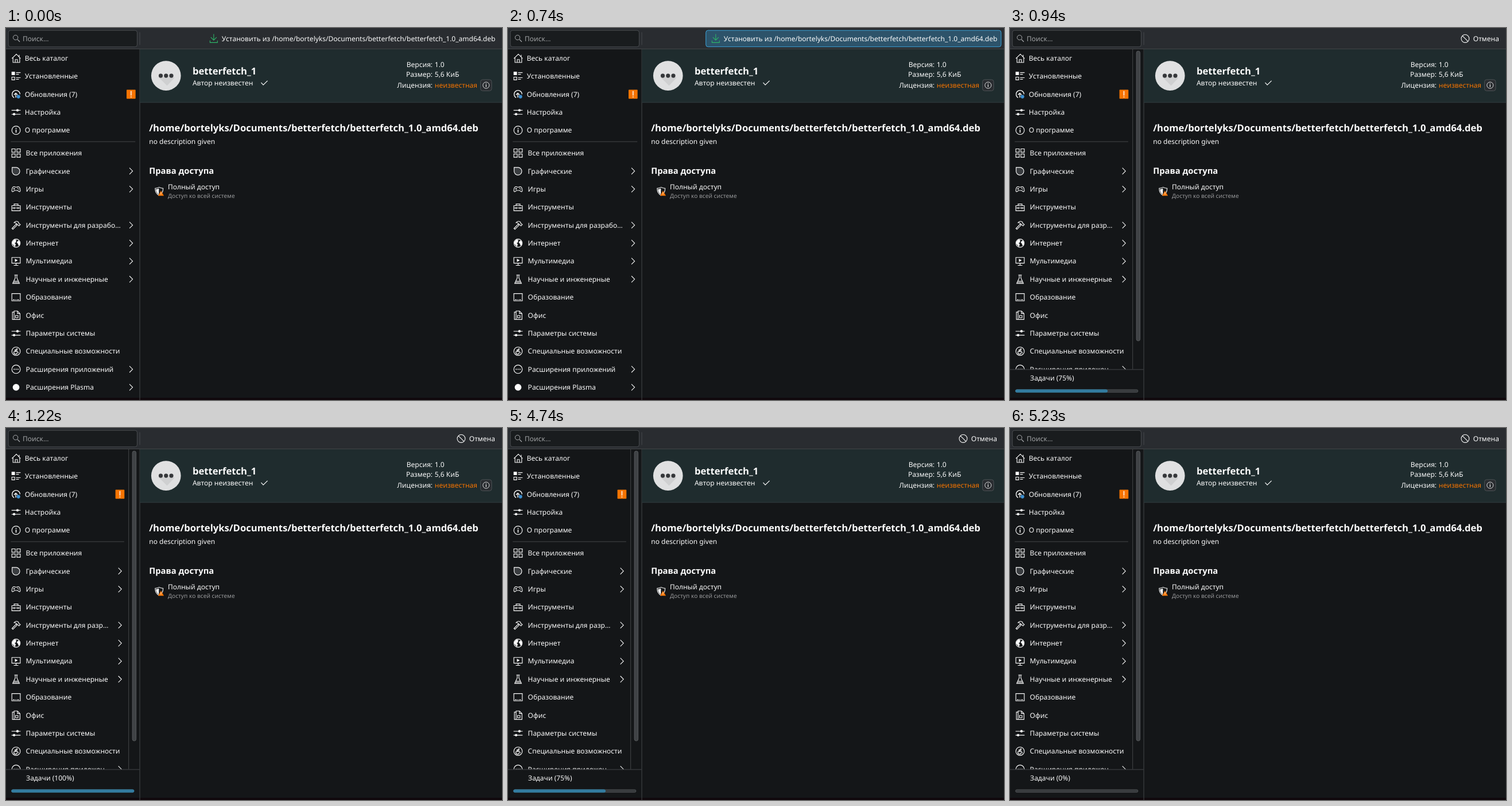
An HTML page that plays this animation: 864 px wide and 648 px high, repeating every 8000 ms.

```html
<!DOCTYPE html>
<html lang="ru">
<head>
<meta charset="utf-8">
<title>Установка пакета</title>
<style>
html, body { margin: 0; width: 100%; height: 100%; overflow: hidden; background: #141618; }
svg { display: block; width: 864px; height: 648px; }
text { font: 13px "Noto Sans", sans-serif; fill: #fcfcfc; white-space: pre; text-rendering: geometricPrecision; }
.line { fill: none; stroke: #fcfcfc; stroke-width: 1.15; }
.fill { fill: #fcfcfc; stroke: none; }
.edge { fill: none; stroke: #484b4e; }
</style>
</head>
<body>
<svg id="stage" viewBox="0 0 936 702" xmlns="http://www.w3.org/2000/svg"></svg>
<script>
const stage = document.getElementById('stage');
const FILE = '/home/bortelyks/Documents/betterfetch/betterfetch_1.0_amd64.deb';

const label = (x, y, s, extra = '') => `<text x="${x}" y="${y}" ${extra}>${s}</text>`;
const line = (d, extra = '') => `<path class="line" d="${d}" ${extra}/>`;
const solid = (d, extra = '') => `<path class="fill" d="${d}" ${extra}/>`;
const dot = (x, y, r, extra = 'class="fill"') => `<circle cx="${x}" cy="${y}" r="${r}" ${extra}/>`;
const ring = (x, y, r) => dot(x, y, r, 'class="line"');
const rect = (x, y, w, h, extra) => `<rect x="${x}" y="${y}" width="${w}" height="${h}" ${extra}/>`;
const bold = size => `style="font-size:${size}px;font-weight:700"`;

// Icons live in a 16 by 16 box
const sliders = line('M0 4.5H16M0 11.5H16') + dot(10.5, 4.5, 2.2) + dot(4.5, 11.5, 2.2);
const info = ring(8, 8, 7.5) + solid('M7.2 3.8h1.6v1.7h-1.6zM7.2 6.8h1.6v5.4h-1.6z');
const icons = {
  home: line('M.5 8.5L8.5 .7L16 8.5M2.5 7V15.5H14.5V7M6.5 15.5V10.5H10.5V15.5M13.5 5.5V2'),
  installed: solid('M0 0h6v6h-6z') + line('M.5 9.5h5v5h-5zM8 1.5h8M8 4.5h5M8 10.5h8M8 13.5h5'),
  updates: line('M4.5 14.2A7 7 0 1 1 15 8M7.5 14V6.2M4.3 9.2L7.5 6L10.7 9.2', 'style="stroke-width:1.4"') +
    dot(12.2, 12.3, 3.2, 'fill="#3d8fd0"'),
  sliders,
  info,
  grid: line('M.5 .5h6v6h-6zM9.5 .5h6v6h-6zM.5 9.5h6v6h-6zM9.5 9.5h6v6h-6z'),
  graphics: line('M1 1.5H8.5A6.8 6.8 0 1 1 1 8.5Z', 'style="fill:#3a3d40"'),
  games: line('M4.5 3.5C5.5 3.5 6 4.5 7 4.5H9C10 4.5 10.5 3.5 11.5 3.5C14 3.5 15.5 7 15.5 10.5C15.5 13.5 13 13 11 10.5H5C3 13 .5 13.5 .5 10.5C.5 7 2 3.5 4.5 3.5ZM3 7.5H6M4.5 6V9') +
    dot(11, 6.5, .8) + dot(12.5, 8.2, .8),
  toolbox: line('M.5 5.5H15.5V14.5H.5ZM4.5 5.5V2.5H11.5V5.5M.5 9.5H15.5M4.5 8V11.5M11.5 8V11.5'),
  hammer: line('M.7 14L8 6.5L9.7 8.2L2.4 15.5ZM4.5 3.5C7.5 .5 10.5 .7 12.5 3L12.5 4.5L15.5 7L13.2 9.3L10.5 6.7L8.5 5.2C7.5 3.8 6.3 3.5 4.5 3.5Z'),
  globe: ring(8, 8, 7.3) + solid('M1.5 5.5L5 1.6L9 2L7.5 4.5L8.5 6L5.5 8L7.5 10L6 14.7L3.5 11.5L1.4 9ZM10 5L13 3L15 7L14.5 11.5L12 12L11.5 9L9.5 7.5Z'),
  media: line('M.5 1.5H15.5V11.5H.5ZM8 11.5V15M4 15.5H12') + solid('M6 3.7L11 6.5L6 9.3Z'),
  science: line('M5 .5H11M6.5 .5V6L2 15.5H14L9.5 6V.5M4.2 11.5H11.8') + solid('M4.3 12H11.7L13 15H3Z', 'opacity=".45"'),
  school: line('M.5 1.5H15.5V14.5H.5ZM2.5 12.5H5.5M7 12.5H8.5M10 12.5H13'),
  office: line('M4.5 2.5H1.5V15.5H4.5M4.5 .5H10.5L15 5V15.5H4.5ZM10.5 .5V5H15M7 8.5H11.5V12.5H7Z'),
  access: ring(8, 8, 7.5) + line('M8.5 5.2L7.2 8.5H10.5L12.2 11.5M7 7.2A3 3 0 1 0 10 11M5.5 5.5L8.5 5.2L10.5 6.3', 'style="stroke-width:1.3"') + dot(9.6, 3.6, 1.1),
  addons: ring(8, 8, 7.5) + dot(4.6, 8, 1) + dot(8, 8, 1) + dot(11.4, 8, 1),
  plain: dot(8, 8, 6)
};
const icon = (name, x, y, scale = 1.06) =>
  `<g transform="translate(${x} ${y}) scale(${scale}) translate(-8 -8)">${icons[name]}</g>`;

const main = [
  ['home', 'Весь каталог'], ['installed', 'Установленные'], ['updates', 'Обновления (7)'],
  ['sliders', 'Настройка'], ['info', 'О программе']
];
// icon, text, has submenu, text when narrow
const groups = [
  ['grid', 'Все приложения'],
  ['graphics', 'Графические', 1],
  ['games', 'Игры', 1],
  ['toolbox', 'Инструменты'],
  ['hammer', 'Инструменты для разрабо…', 1, 'Инструменты для разр…'],
  ['globe', 'Интернет', 1],
  ['media', 'Мультимедиа', 1],
  ['science', 'Научные и инженерные', 1],
  ['school', 'Образование'],
  ['office', 'Офис'],
  ['sliders', 'Параметры системы'],
  ['access', 'Специальные возможности'],
  ['addons', 'Расширения приложений', 1, 'Расширения приложен…'],
  ['plain', 'Расширения Plasma', 1]
];

function sidebar(narrow) {
  const shift = narrow ? -21 : 0;
  const base = 4.7;
  let s = main.map(([name, text], i) => {
    const y = 57 + 34 * i;
    return icon(name, 19, y) + label(35.5, y + base, text);
  }).join('');
  s += `<g transform="translate(${shift} 0)">` + rect(227.5, 116.5, 17, 17, 'rx="1" fill="#f67400"') +
    solid('M235.2 119h1.6v8.5h-1.6zM235.2 129.3h1.6v1.9h-1.6z') + '</g>';
  s += `<path class="edge" d="M9 214.5H${244 + shift}"/>`;
  groups.forEach(([name, text, sub, short], i) => {
    const y = 236 + 34 * i;
    s += icon(name, 19, y) + label(37.5, y + base, narrow && short || text);
    if (sub) s += line(`M${233 + shift} ${y - 6}l6 6l-6 6`);
  });
  return s;
}

const banner = rect(253, 40, 683, 100, 'fill="#1f2c2e"') +
  '<path class="edge" d="M253 140.5H936" style="stroke:#364346"/>' +
  dot(302, 90, 28, 'fill="url(#disc)"') +
  '<path d="M287 92L304 109L318 94L313 91Z" fill="#000" opacity=".07"/>' +
  [292, 302, 312].map(x => dot(x, 90, 3.9, 'fill="#35373a"')).join('') +
  label(352, 88, 'betterfetch_1', bold(18)) +
  label(352, 108, 'Автор неизвестен') + line('M481.5 103L485.5 107.5L493.5 99.5', 'style="stroke-width:1.3"') +
  [['Версия:', '1.0', 74], ['Размер:', '5,6 КиБ', 92], ['Лицензия:', 'неизвестная', 113]].map(([k, v, y]) =>
    label(805, y, k, 'text-anchor="end"') +
    label(809, y, v, y > 100 ? 'style="fill:#f67400"' : '')).join('') +
  rect(895.5, 97.5, 21, 21, 'rx="4" fill="#292c30" stroke="#51575a"') +
  icon('info', 906, 108, .8);

const details = label(270, 195, FILE, bold(18)) +
  label(270, 219, 'no description given') +
  label(270, 275.7, 'Права доступа', bold(16)) +
  label(305.5, 304.7, 'Полный доступ') +
  label(305.5, 320.8, 'Доступ ко всей системе', 'style="font-size:11px;fill:#999a9c"') +
  line('M289 300.5C286 302 284 302.5 281.5 302.5C281.5 309 283 313 289 316C295 313 296.5 309 296.5 302.5C294 302.5 292 302 289 300.5Z') +
  solid('M288.5 302.5C286.5 303.7 285 304 283 304.2C283.3 309 285 312.2 288.5 314.2Z') +
  '<path d="M292.5 307L298 316.5H287Z" fill="#f67400"/>' + solid('M292 310h1v3h-1zM292 314h1v1h-1z');

stage.innerHTML = `
<defs>
  <linearGradient id="disc" x2="0" y2="1"><stop stop-color="#e1e1e2"/><stop offset="1" stop-color="#dedfe0"/></linearGradient>
  <clipPath id="list"><rect width="252" height="644"/></clipPath>
</defs>
${rect(0, 0, 936, 702, 'fill="#141618"')}
${rect(0, 0, 936, 40, 'id="bar"')}
${rect(0, 698, 936, 4, 'fill="#10080c"')}
<path class="edge" d="M0 39.5H936M252.5 40V702M252.5 8V32"/>
${rect(4.5, 4.5, 243, 31, 'rx="4" fill="#191c1e" stroke="#4d5053"')}
${line('M21.5 21.5L26 26', 'style="stroke:#b5b7b9"')}${dot(18, 18, 4.5, 'fill="none" stroke="#b5b7b9"')}
${label(31.5, 25, 'Поиск…', 'style="fill:#a2a4a6"')}
${banner}${details}
<g id="wide">${sidebar(false)}</g>
<g id="narrow">
  <g clip-path="url(#list)">${sidebar(true)}</g>
  <path class="edge" d="M231.5 40V644M0 644.5H252"/>
  ${rect(238.5, 43.5, 7, 547, 'rx="3.5" fill="#3f4245" stroke="#5a5d5f"')}
  <text id="task" x="38" y="665"></text>
  ${rect(10.5, 682.5, 231, 5, 'rx="2.5" fill="#36393c" stroke="#505356"')}
  ${rect(10.5, 682.5, 0, 5, 'id="done" rx="2.5"')}
</g>
<g id="install">
  ${rect(373.5, 4.5, 557, 31, 'id="frame" rx="4"')}
  <path d="M392 11.5V22.5M386.5 17.5L392 23L397.5 17.5M385 23.5V27.5H399V23.5" fill="none" stroke="#2eb568" stroke-width="1.15"/>
  ${label(407, 25, 'Установить из ' + FILE)}
</g>
<g id="cancel">${ring(859, 20, 7.5)}${line('M853.7 14.7L864.3 25.3')}${label(874, 25, 'Отмена')}</g>`;

const part = {};
for (const id of ['bar', 'wide', 'narrow', 'task', 'done', 'install', 'frame', 'cancel'])
  part[id] = document.getElementById(id);
const set = (id, attrs) => { for (const k in attrs) part[id].setAttribute(k, attrs[k]); };
const show = (id, on) => set(id, { visibility: on ? 'visible' : 'hidden' });

// start time in ms, button look or percent done, window out of focus
const steps = [
  { at: 0, button: 'rest' },
  { at: 500, button: 'hover' },
  { at: 740, button: 'down' },
  { at: 870, done: 0 },
  { at: 940, done: 75 },
  { at: 1220, done: 100 },
  { at: 1570, done: 100, blur: true },
  { at: 4740, done: 75 },
  { at: 4980, done: 100 },
  { at: 5130, done: 0 }
];
const looks = {
  rest: { fill: 'none', stroke: 'none' },
  hover: { fill: '#292c30', stroke: '#3daee9' },
  down: { fill: '#2d536a', stroke: '#3daee9' }
};

let current;
function draw(t) {
  const step = steps.filter(s => s.at <= t).pop();
  if (step === current) return;
  current = step;
  const { button, done, blur } = step;
  show('install', button);
  show('wide', button);
  show('cancel', !button);
  show('narrow', !button);
  set('bar', { fill: blur ? '#202326' : '#292c30' });
  if (button) {
    set('frame', looks[button]);
    show('done', false);
    return;
  }
  part.task.textContent = `Задачи (${done}%)`;
  set('done', { width: 231 * done / 100, fill: blur ? '#1d3744' : '#327a9e', stroke: blur ? '#25495a' : '#3585ab' });
  show('done', done > 0);
}

function tick() {
  draw(performance.now() % 8000);
  requestAnimationFrame(tick);
}
tick();
</script>
</body>
</html>
```
